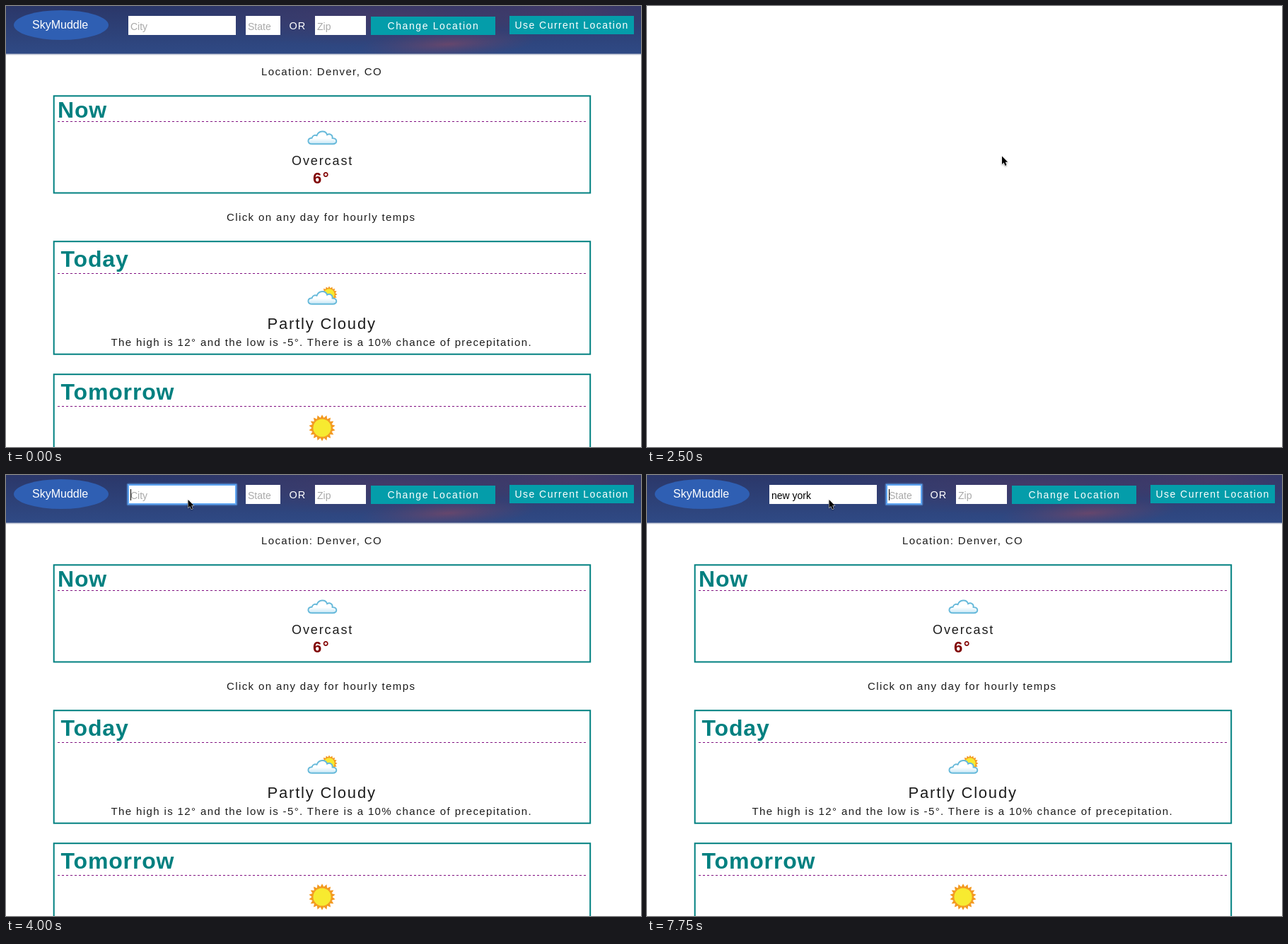
An HTML page that plays this animation: 898 by 624 pixels, repeating every 8 s.

```html
<!DOCTYPE html>
<html lang="en">
<head>
<meta charset="utf-8">
<title>Weather page</title>
<style>
  html, body { margin: 0; width: 100%; height: 100%; overflow: hidden; background: #fff; }
  svg { display: block; width: 898px; height: 624px; }
  text { font-family: "Liberation Sans", Arial, sans-serif; white-space: pre; }
  .body { font-size: 15px; letter-spacing: 1.38px; fill: #1c1c1c; }
  .head { font-size: 32px; font-weight: bold; letter-spacing: .85px; fill: #008080; }
  .btn { font-size: 14px; fill: #fff; }
  .hint { font-size: 14px; fill: #a9a9a9; }
  .typed { font-size: 14px; fill: #000; }
  .box { fill: none; stroke: #008080; stroke-width: 2; }
  .rule { stroke: #800080; stroke-width: 1; stroke-dasharray: 3 3; }
  .ring rect { fill: none; stroke: #5fa5f2; }
</style>
</head>
<body>
<svg viewBox="0 0 898 624">
  <defs>
    <linearGradient id="sky" x1="0" y1="0" x2="0" y2="1">
      <stop offset="0" stop-color="#2b3769"/>
      <stop offset="1" stop-color="#2f4a85"/>
    </linearGradient>
    <radialGradient id="rose">
      <stop offset="0" stop-color="#7d4765" stop-opacity=".7"/>
      <stop offset="1" stop-color="#5a4068" stop-opacity="0"/>
    </radialGradient>
    <radialGradient id="plum">
      <stop offset="0" stop-color="#493a66" stop-opacity=".8"/>
      <stop offset="1" stop-color="#433a68" stop-opacity="0"/>
    </radialGradient>
    <linearGradient id="edge" x1="0" y1="0" x2="0" y2="1">
      <stop offset="0" stop-color="#a3abc0"/>
      <stop offset="1" stop-color="#fff"/>
    </linearGradient>
    <linearGradient id="puff" x1="0" y1="0" x2="0" y2="1">
      <stop offset=".55" stop-color="#fff"/>
      <stop offset="1" stop-color="#c4e6f5"/>
    </linearGradient>
    <filter id="drop" x="-60%" y="-40%" width="220%" height="200%">
      <feDropShadow dx="0" dy="1" stdDeviation="1" flood-opacity=".4"/>
    </filter>
    <path id="cloud" d="M6.5 18.5C-1 18.5-1 10.5 6 10C7 6 10.5 5.3 13 6.5C15.5-1 25.5-1 27.5 5.5C31 3 35.8 5.5 35 10.3C42.5 10.3 42.5 18.5 35.5 18.5Z"
      fill="url(#puff)" stroke="#66b9da" stroke-width="1.9"/>
  </defs>

  <g id="page">
    <rect width="898" height="68" fill="url(#sky)"/>
    <svg width="898" height="68">
      <ellipse cx="560" cy="14" rx="330" ry="44" fill="url(#plum)"/>
      <ellipse cx="800" cy="6" rx="170" ry="34" fill="url(#plum)"/>
      <ellipse cx="625" cy="54" rx="125" ry="20" fill="url(#rose)" transform="rotate(-3 625 54)"/>
    </svg>
    <rect y="67.5" width="898" height="2.5" fill="url(#edge)"/>
    <ellipse cx="78" cy="27" rx="67" ry="21" fill="#2f5fb3"/>
    <text x="37" y="32" font-size="16" fill="#fff">SkyMuddle</text>

    <g fill="#fff">
      <rect x="173" y="14" width="152" height="27"/>
      <rect x="339" y="14" width="49" height="27"/>
      <rect x="437" y="14" width="72" height="27"/>
    </g>
    <g fill="#049daa">
      <rect x="516" y="15" width="176" height="26"/>
      <rect x="712" y="14" width="176" height="26"/>
    </g>
    <text class="btn" x="400.5" y="33" style="font-size:14.5px;letter-spacing:1px">OR</text>
    <text class="btn" x="539.5" y="33" style="letter-spacing:1.6px">Change Location</text>
    <text class="btn" x="719.5" y="32" style="letter-spacing:1.45px">Use Current Location</text>

    <g class="ring" id="ring">
      <rect id="ringOut" stroke-width="2" stroke-opacity=".45"/>
      <rect id="ringIn" stroke-width="2"/>
    </g>
    <text class="hint" id="cityHint" x="176" y="33.5">City</text>
    <text class="hint" x="342" y="33.5">State</text>
    <text class="hint" x="440" y="33.5">Zip</text>
    <text class="typed" id="city" x="176" y="33.5"></text>
    <rect id="caret" y="20" width="1" height="16"/>

    <text class="body" x="361" y="98">Location: Denver, CO</text>

    <rect class="box" x="67.7" y="127.3" width="758.5" height="137.2"/>
    <text class="head" x="73" y="158">Now</text>
    <path class="rule" d="M73 163.5H821"/>
    <use href="#cloud" x="426.6" y="176.8"/>
    <text class="body" x="404" y="225" style="font-size:18px;letter-spacing:1.9px">Overcast</text>
    <text x="434" y="251" font-size="22" font-weight="bold" letter-spacing="1.5" fill="#800000">6°</text>

    <text class="body" x="312" y="303.5">Click on any day for hourly temps</text>

    <rect class="box" x="67.7" y="333.2" width="758.5" height="159.5"/>
    <text class="head" x="77.5" y="368.5">Today</text>
    <path class="rule" d="M73 378.5H821"/>
    <g id="smallSun"></g>
    <use href="#cloud" x="426.6" y="403.3"/>
    <text class="body" x="369.5" y="457" style="font-size:22px;letter-spacing:1.8px">Partly Cloudy</text>
    <text class="body" x="148.5" y="481">The high is 12° and the low is -5°. There is a 10% chance of precepitation.</text>

    <rect class="box" x="67.7" y="521.2" width="758.5" height="159.5"/>
    <text class="head" x="77.5" y="556.5">Tomorrow</text>
    <path class="rule" d="M73 566.5H821"/>
    <g id="bigSun"></g>
  </g>

  <path id="arrow" d="M0 0V11.5L2.6 9.1L4.5 13.4L6.5 12.6L4.7 8.3H8.1Z" stroke="#fff" stroke-width="1"
    paint-order="stroke" filter="url(#drop)"/>
</svg>
<script>
const LOOP = 8000;
const el = id => document.getElementById(id);
const show = (node, on) => node.setAttribute('visibility', on ? 'visible' : 'hidden');
const setAll = (node, attrs) => {
  for (const key in attrs) node.setAttribute(key, attrs[key]);
};

function drawSun(id, cx, cy, r, rays) {
  const pts = [];
  for (let i = 0; i < rays * 2; i++) {
    const a = i * Math.PI / rays - Math.PI / 2;
    const d = i % 2 ? r * 0.77 : r;
    pts.push((cx + d * Math.cos(a)).toFixed(2) + ',' + (cy + d * Math.sin(a)).toFixed(2));
  }
  el(id).innerHTML = `<polygon points="${pts.join(' ')}" fill="#f39a22"/>` +
    `<circle cx="${cx}" cy="${cy}" r="${r * 0.67}" fill="#f7ea30"/>`;
}
drawSun('smallSun', 457, 408, 11.5, 16);
drawSun('bigSun', 447, 597, 18.8, 18);

// Screen-capture states: each holds until the next one starts.
const pointer = [
  [250, 495, 225], [500, 479, 224], [1000, 479, 225], [1250, 473, 223],
  [1500, 469, 180], [2000, 502, 212.5], [3250, 335, 111], [3500, 269, 70],
  [3750, 257, 39], [4000, 257.5, 35]
];
const typing = [
  [0, ''], [5250, 'n'], [5500, 'new'], [6250, 'new '], [6500, 'new y'],
  [6750, 'new ypork'], [7000, 'new ypor'], [7250, 'new yp'], [7500, 'new york']
];
const fields = { city: [173, 152], state: [339, 49] };

const at = (steps, t) => steps.filter(s => s[0] <= t).pop();

function textWidth(node, str) {
  // A trailing space is measured together with a mark after it.
  if (!str) return 0;
  node.textContent = str + '|';
  const full = node.getComputedTextLength();
  node.textContent = '|';
  const mark = node.getComputedTextLength();
  node.textContent = str;
  return full - mark;
}

function focusField(name) {
  show(el('ring'), !!name);
  if (!name) return;
  const [x, w] = fields[name];
  setAll(el('ringIn'), { x, y: 14, width: w, height: 27 });
  setAll(el('ringOut'), { x: x - 1.5, y: 12.5, width: w + 3, height: 30, rx: 1.5 });
}

let lastTick = -1;
function render(t) {
  const tick = Math.floor(t / 250);
  if (tick === lastTick) return;
  lastTick = tick;

  el('page').style.display = t >= 2500 && t < 2750 ? 'none' : '';

  const pos = at(pointer, t);
  show(el('arrow'), !!pos);
  if (pos) setAll(el('arrow'), { transform: `translate(${pos[1]} ${pos[2]})` });

  const focus = t < 4000 ? '' : t < 7750 ? 'city' : 'state';
  focusField(focus);

  const str = at(typing, t)[1];
  const city = el('city');
  city.textContent = str;
  show(el('cityHint'), !str);

  const blinkOff = (t >= 4500 && t < 5000) || (t >= 6000 && t < 6250);
  show(el('caret'), !!focus && !blinkOff);
  const x = focus === 'state' ? 342 : 176 + Math.floor(textWidth(city, str) + 0.2);
  setAll(el('caret'), { x });
}

function frame() {
  render(performance.now() % LOOP);
  requestAnimationFrame(frame);
}
frame();
</script>
</body>
</html>
```
